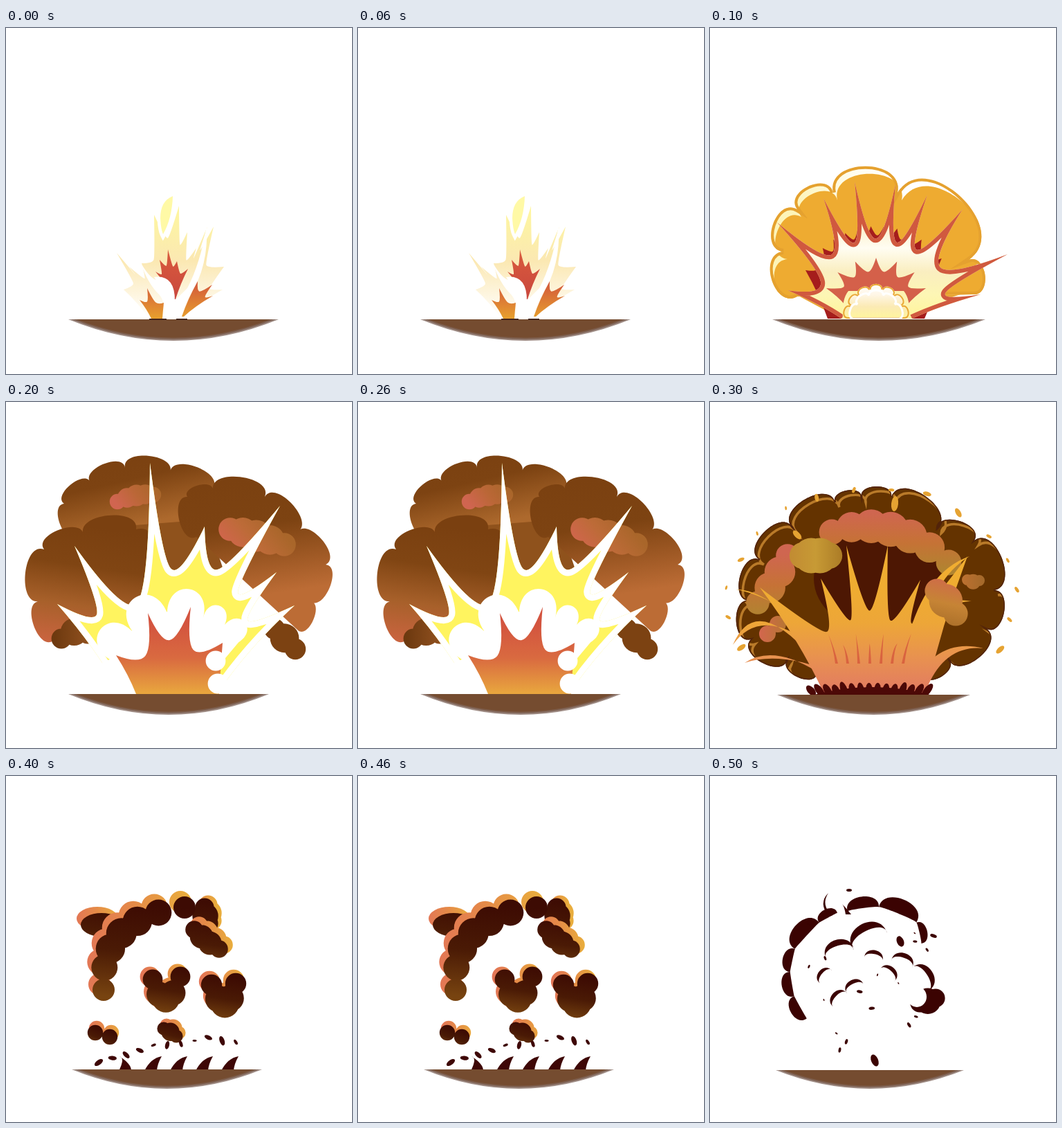
Write an HTML page with a canvas that moves like this. It is 500 px wide and 500 px high and loops after 600 ms.

```html
<!DOCTYPE html>
<html lang="en">
<head>
<meta charset="utf-8">
<title>Explosion</title>
<style>
html, body { margin: 0; width: 100%; height: 100%; overflow: hidden; background: #fff; }
canvas { display: block; width: 500px; height: 500px; }
</style>
</head>
<body>
<canvas id="stage" width="500" height="500"></canvas>
<script>
const g = document.getElementById('stage').getContext('2d');
const STEP = 100;

const toPath = shape => typeof shape === 'string' ? new Path2D(shape) : shape;
const mix = (a, b, t) => a + (b - a) * t;
const quad = (a, c, b, t) => mix(mix(a, c, t), mix(c, b, t), t);
const pairs = list => list.flatMap((x, i) => i % 2 ? [] : [[x, list[i + 1]]]);
const seeded = s => () => (s = s * 16807 % 2147483647) / 2147483647;

function fill(shape, style) {
  g.fillStyle = style;
  g.fill(toPath(shape));
}

function line(shape, style, width) {
  g.strokeStyle = style;
  g.lineWidth = width;
  g.stroke(toPath(shape));
}

function within(shape, draw) {
  g.save();
  g.clip(shape);
  draw();
  g.restore();
}

function shifted(dx, dy, draw) {
  g.save();
  g.translate(dx, dy);
  draw();
  g.restore();
}

// Fill with an edge that lies inside the outline.
function edged(shape, inside, edge, width) {
  fill(shape, inside);
  within(shape, () => line(shape, edge, width * 2));
}

function ramp(x0, y0, x1, y1, ...colors) {
  const r = g.createLinearGradient(x0, y0, x1, y1);
  colors.forEach((c, i) => r.addColorStop(i / (colors.length - 1), c));
  return r;
}
const down = (y0, y1, ...colors) => ramp(0, y0, 0, y1, ...colors);
const across = (x0, x1, ...colors) => ramp(x0, 0, x1, 0, ...colors);

// Arc from a to b, bulging to the left of the direction of travel.
function lobe(p, [ax, ay], [bx, by], h, spread = 0.12) {
  const dx = bx - ax, dy = by - ay;
  p.bezierCurveTo(ax + dy * h - dx * spread, ay - dx * h - dy * spread,
    bx + dy * h + dx * spread, by - dx * h + dy * spread, bx, by);
}

// Lobes between the given corners, closed by a straight line.
function cloud(corners, bulge) {
  const p = new Path2D(), pts = pairs(corners);
  p.moveTo(...pts[0]);
  for (let i = 1; i < pts.length; i++) lobe(p, pts[i - 1], pts[i], bulge);
  p.closePath();
  return p;
}

// Curved spikes; each valley is pulled from between two tips to the focus.
function burst(left, right, focus, tips, depth, round = 0.16) {
  const p = new Path2D(), pts = pairs(tips), last = pts[pts.length - 1];
  const pull = i => Array.isArray(depth) ? depth[i] : depth;
  p.moveTo(left, focus[1]);
  p.quadraticCurveTo(mix(left, pts[0][0], 0.38), mix(focus[1], pts[0][1], 0.5), ...pts[0]);
  pts.slice(1).forEach((b, i) => {
    const a = pts[i];
    const x = mix((a[0] + b[0]) / 2, focus[0], pull(i)), y = mix((a[1] + b[1]) / 2, focus[1], pull(i));
    const dx = (b[0] - a[0]) * round, dy = (b[1] - a[1]) * round;
    p.quadraticCurveTo(x - dx, y - dy, x, y);
    p.quadraticCurveTo(x + dx, y + dy, ...b);
  });
  p.quadraticCurveTo(mix(right, last[0], 0.38), mix(focus[1], last[1], 0.5), right, focus[1]);
  return p;
}

// Points evenly spread over the upper half of an oval.
const fan = (cx, cy, rx, ry, n, margin = 0) => Array.from({ length: n }, (_, i) => {
  const a = Math.PI + mix(margin, Math.PI - margin, i / (n - 1));
  return [cx + rx * Math.cos(a), cy + ry * Math.sin(a)];
}).flat();

// Balls along a curve, largest in the middle.
function beads(x0, y0, cx, cy, x1, y1, n, r) {
  const p = new Path2D();
  for (let i = 0; i < n; i++) {
    const t = i / (n - 1), x = quad(x0, cx, x1, t), y = quad(y0, cy, y1, t);
    const size = r * (0.8 + 0.3 * Math.sin(Math.PI * t));
    p.moveTo(x + size, y);
    p.arc(x, y, size, 0, 7);
  }
  return p;
}

function oval(x, y, rx, ry, tilt, style) {
  const p = new Path2D();
  p.ellipse(x, y, rx, ry, tilt, 0, 7);
  fill(p, style);
}

function scatter(n, seed, size, style, place) {
  const rnd = seeded(seed);
  for (let i = 0; i < n; i++) {
    const [x, y] = place(rnd, i / (n - 1)), r = size * (0.5 + rnd());
    oval(x, y, r, r * 0.5, rnd() * 3 - 1.5, style);
  }
}

// Tapered stroke, pointed at the far end.
function streak(x0, y0, cx, cy, x1, y1, w, style) {
  fill(`M${x0 - w} ${y0}Q${cx - w / 2} ${cy - w / 2} ${x1} ${y1}Q${cx + w / 2} ${cy + w / 2} ${x0 + w} ${y0}Z`, style);
}

function crescents(corners, out, inn, style) {
  const pts = pairs(corners);
  pts.slice(1).forEach((b, i) => {
    const p = new Path2D();
    p.moveTo(...pts[i]);
    lobe(p, pts[i], b, out);
    lobe(p, b, pts[i], -inn);
    fill(p, style);
  });
}

function ground(l, r, y, core = '#754c30') {
  ['#a3918a', '#876e63', '#7b5a47', core].forEach((c, i) => {
    const a = l + i * 4, b = r - i * 4, low = 2 * (452 - i * 1.5) - y;
    fill(`M${a} ${y}Q${(a + b) / 2} ${low} ${b} ${y}Z`, c);
  });
}

function spark() {
  fill(burst(205, 255, [238, 418],
    [170, 378, 160, 325, 178, 345, 196, 340, 214, 270, 250, 257, 262, 295, 275, 318,
      291, 287, 300, 287, 315, 345, 313, 378], 0.26, 0.08),
    down(255, 418, '#fff79d', '#fcf0a8', '#fbe8b2', '#fdf3d8', '#fff'));
  const leaf = 'M241 243Q223 250 223 275Q224 292 227 298Q240 275 241 243Z';
  line(leaf, '#fff', 9);
  fill(leaf, '#fff9a6');
  fill('M194 338Q207 361 217 364Q244 352 246 392L262 376Q281 340 290 285Q293 345 266 386L250 420H231Q230 396 222 386Q205 370 194 338Z', '#fff');
  fill(burst(243, 245, [243, 392], [216, 352, 222, 335, 234, 320, 247, 337, 263, 348], 0.25, 0.1),
    down(320, 392, '#d95b3d', '#c9473d'));
  fill('M214 360Q244 356 244 394L242 420H230Q232 385 214 360Z', '#fff');
  const ember = down(366, 420, '#d2553c', '#e7a02d');
  fill(burst(210, 226, [217, 420], [193, 393, 204, 376, 228, 397], 0.3), ember);
  fill(burst(254, 257, [255, 417], [277, 366, 298, 371, 299, 387], 0.25), ember);
  ground(90, 394, 421);
  fill('M207 420H232V422H207ZM246 420H262V422H246Z', '#42251b');
}

function fireball() {
  const puff = cloud([126, 388, 106, 323, 126, 262, 178, 238, 271, 238, 374, 335, 380, 385], 0.55);
  fill('M115 380Q155 402 190 420H292Q320 395 380 380Z', '#e8a431');
  fill(puff, across(120, 300, '#fdf4b8', '#fffdf0', '#fff'));
  within(puff, () => {
    shifted(6, 11, () => fill(puff, '#eeab31'));
    fill('M130 388L180 330H380L398 390Z', '#eeab31');
    line(puff, '#e5a12f', 8);
  });
  const focus = [240, 420];
  fill(burst(170, 310, focus, fan(242, 420, 122, 134, 14, 0.55), 0.1), '#a51d1c');
  edged(burst(190, 292, focus,
    [112, 379, 97, 281, 164, 246, 209, 222, 268, 226, 314, 241, 365, 262, 430, 327, 391, 385], 0.41, 0.2),
    down(250, 420, '#f7e3a4', '#fbf0c8', '#fffdf2', '#faeec0', '#fdf6b4', '#fff49a'), '#d0593f', 6);
  fill(burst(195, 285, [240, 400], fan(240, 400, 77, 68, 7, 0.36), 0.27), '#d4604a');
  fill('M192 420Q190 392 200 380H280Q290 392 288 420Z', '#fdf3b0');
  const core = cloud(fan(240, 420, 41, 43, 8), 0.6);
  edged(core, down(368, 420, '#fff', '#fff6e6', '#fbeab4', '#fff59c'), '#e9a834', 2);
  line(cloud(fan(240, 420, 33, 35, 6), 0.5), '#fff', 3);
  ground(90, 398, 421, '#6c422b');
}

function flare() {
  const brown = (y0, y1, end = '#ad692d') => ramp(0, y0, 30, y1, '#7a4010', '#7d4312', end);
  fill(cloud([104, 196, 84, 147, 122, 116, 172, 95, 237, 102, 299, 125, 295, 190], 0.42), brown(85, 215));
  fill('M160 180L290 170L330 290H150Z', '#8f521c');
  fill(cloud([275, 195, 262, 137, 299, 127, 374, 137, 421, 188, 462, 235, 440, 288, 422, 330], 0.42),
    brown(130, 330, '#bc6c35'));
  fill(cloud([68, 345, 48, 288, 55, 213, 112, 192, 188, 184, 190, 300, 120, 340], 0.42),
    ramp(120, 180, 95, 350, '#7a4010', '#804513', '#a7602a', '#c9643f'));
  fill(beads(80, 342, 98, 326, 118, 335, 3, 18), across(70, 130, '#6d390f', '#985623'));
  fill(beads(388, 328, 402, 340, 418, 357, 3, 19), '#7c4212');
  fill(beads(161, 144, 190, 131, 213, 134, 5, 14), ramp(215, 120, 165, 155, '#a9662a', '#bb6737', '#d06550'));
  fill(beads(324, 184, 360, 192, 402, 206, 5, 21), ramp(385, 170, 325, 220, '#a9662a', '#bd6b38', '#d2654e'));
  edged(burst(166, 305, [222, 422],
    [74, 292, 99, 208, 208, 88, 287, 180, 396, 150, 391, 246, 417, 294],
    [0.33, 0.52, 0.37, 0.3, 0.34, 0.3]), '#fff45f', '#fff', 9);
  fill(cloud([176, 422, 150, 372, 183, 332, 233, 305, 285, 312, 316, 322, 338, 346], 0.98), '#fff');
  fill('M172 422L146 350L233 303L338 345L312 376L302 422Z', '#fff');
  fill(burst(188, 308, [236, 422], [159, 366, 205, 305, 267, 296, 313, 348], 0.36, 0.2),
    down(320, 420, '#d3543f', '#d96a40', '#e8a53e'));
  fill(beads(303, 374, 310, 390, 306, 407, 2, 18), '#fff');
  ground(90, 380, 422);
}

function eruption() {
  const smoke = cloud([155, 392, 112, 372, 59, 343, 57, 287, 72, 228, 119, 181, 181, 145,
    219, 138, 262, 137, 328, 183, 382, 200, 410, 272, 400, 328, 345, 372, 310, 395], 0.48);
  fill(smoke, '#643300');
  within(smoke, () => {
    shifted(6, 7, () => line(smoke, '#b97a29', 3.5));
    line(smoke, '#52230a', 3);
  });
  oval(242, 255, 92, 75, 0, '#4d1703');
  const glow = (y0, y1) => down(y0, y1, '#cf6650', '#c67236', '#b08430');
  fill(beads(176, 188, 262, 158, 345, 232, 7, 23), glow(160, 245));
  fill(beads(112, 222, 98, 258, 69, 290, 4, 21), glow(220, 310));
  fill(beads(134, 222, 152, 222, 172, 222, 4, 24), across(110, 195, '#c18932', '#c79a35', '#a97925'));
  fill(beads(372, 257, 380, 262, 389, 258, 3, 10), across(362, 398, '#be7131', '#a2692a'));
  fill(beads(83, 335, 90, 328, 98, 321, 2, 15), across(72, 112, '#d2674d', '#b57731'));
  const heat = down(220, 420, '#f0ae31', '#efac31', '#eda638', '#e89150', '#e27a62');
  fill(burst(165, 312, [235, 422],
    [72, 268, 160, 255, 197, 207, 257, 207, 304, 257, 372, 223], 0.44, 0.12), heat);
  for (const curve of [
    [165, 345, 85, 275, 38, 271, 10], [160, 370, 72, 280, 33, 351, 12], [165, 390, 96, 355, 50, 377, 10],
    [295, 345, 316, 250, 375, 223, 10], [300, 385, 320, 280, 378, 288, 12], [303, 410, 335, 345, 395, 356, 12]
  ]) streak(...curve, heat);
  fill(beads(328, 273, 340, 285, 355, 306, 3, 22), ramp(345, 255, 330, 325, '#cf6b49', '#c68435', '#a86d28'));
  for (let i = 0; i < 7; i++) {
    const x = 183 + i * 16, lean = (x - 232) * 0.25, top = 335 + (i % 2) * 14;
    streak(x, 378, x + lean * 0.3, 356, x + lean, top, 2, '#d9633f');
  }
  const rnd = seeded(11);
  for (let x = 146; x < 326; x += 12) oval(x, 417, 5, 9 + rnd() * 5, (x - 235) / 120, '#4c0907');
  fill('M146 424Q235 400 322 424Z', '#4c0907');
  scatter(16, 29, 5, '#e6a332', (r, t) => {
    const a = mix(2.75, 6.7, t);
    return [232 + Math.cos(a) * (202 + r() * 12), 290 + Math.sin(a) * (160 + r() * 12)];
  });
  oval(267, 147, 5, 11, 0.1, '#e6a332');
  oval(126, 192, 8, 4, 0.8, '#e6a332');
  ground(97, 376, 423);
}

function breakup() {
  const clump = (shape, dx, dy, l, r, t, b) => {
    shifted(dx, dy, () => fill(shape, across(l, r, '#e27358', '#e58a48', '#e9ad3d')));
    fill(shape, ramp(l + 10, t, l, b, '#3d0b03', '#4a1a05', '#774310'));
  };
  const blob = new Path2D();
  blob.ellipse(138, 215, 30, 17, 0, 0, 7);
  clump(blob, -6, -9, 102, 170, 180, 260);
  clump(beads(287, 190, 286, 203, 293, 213, 3, 17), 5, -4, 240, 300, 175, 270);
  clump(beads(272, 222, 287, 238, 308, 250, 4, 16), 7, -6, 240, 320, 200, 275);
  clump(beads(141, 309, 134, 205, 258, 190, 7, 20), -6, -8, 110, 270, 180, 315);
  clump(beads(212, 294, 230, 352, 252, 290, 5, 18), -4, -4, 196, 268, 270, 340);
  clump(beads(297, 302, 318, 356, 332, 300, 5, 19), -3, -5, 280, 345, 285, 350);
  clump(beads(129, 371, 139, 372, 150, 377, 2, 14), 2, -6, 116, 165, 360, 388);
  clump(beads(228, 365, 238, 369, 246, 376, 3, 12), 4, -5, 214, 262, 350, 390);
  const ash = '#3e0706';
  scatter(11, 7, 5, ash, (r, t) => [mix(134, 332, t), 414 - t * 22 - r() * 20]);
  for (let x = 172; x < 330; x += 37) {
    streak(x, 426, x + 5, 412, x + (x < 200 ? -8 : 16), 405, 9, ash);
  }
  ground(95, 370, 424);
}

function remains() {
  const soot = '#3b0302';
  crescents([140, 350, 122, 318, 116, 283, 123, 250, 158, 212, 184, 198], 0.58, 0.02, soot);
  crescents([199, 196, 244, 190, 298, 212, 305, 242], 0.55, 0.06, soot);
  for (const corners of [
    [168, 264, 208, 252, 256, 227], [223, 263, 249, 268], [160, 300, 176, 281],
    [246, 279, 266, 297], [262, 267, 292, 277, 314, 311], [179, 334, 198, 314, 222, 302]
  ]) crescents(corners, 0.7, 0.42, soot);
  streak(174, 202, 158, 185, 171, 169, 3, soot);
  streak(200, 200, 196, 190, 191, 185, 4, soot);
  fill(beads(303, 328, 315, 326, 326, 321, 3, 17), soot);
  oval(299, 319, 14, 15, 0, '#fff');
  oval(275, 239, 5, 8, -0.4, soot);
  oval(238, 411, 5, 9, -0.4, soot);
  scatter(16, 17, 3, soot, (r, t) => [mix(142, 335, r()), mix(215, 396, t)]);
  oval(201, 165, 4, 2, 0, soot);
  oval(323, 231, 5, 2.5, 0.35, soot);
  ground(95, 367, 425);
}

const scenes = [spark, fireball, flare, eruption, breakup, remains];
let shown = -1;

function play() {
  const now = Math.floor(performance.now() / STEP) % scenes.length;
  if (now !== shown) {
    shown = now;
    g.clearRect(0, 0, 500, 500);
    scenes[now]();
  }
  requestAnimationFrame(play);
}
play();
</script>
</body>
</html>
```
